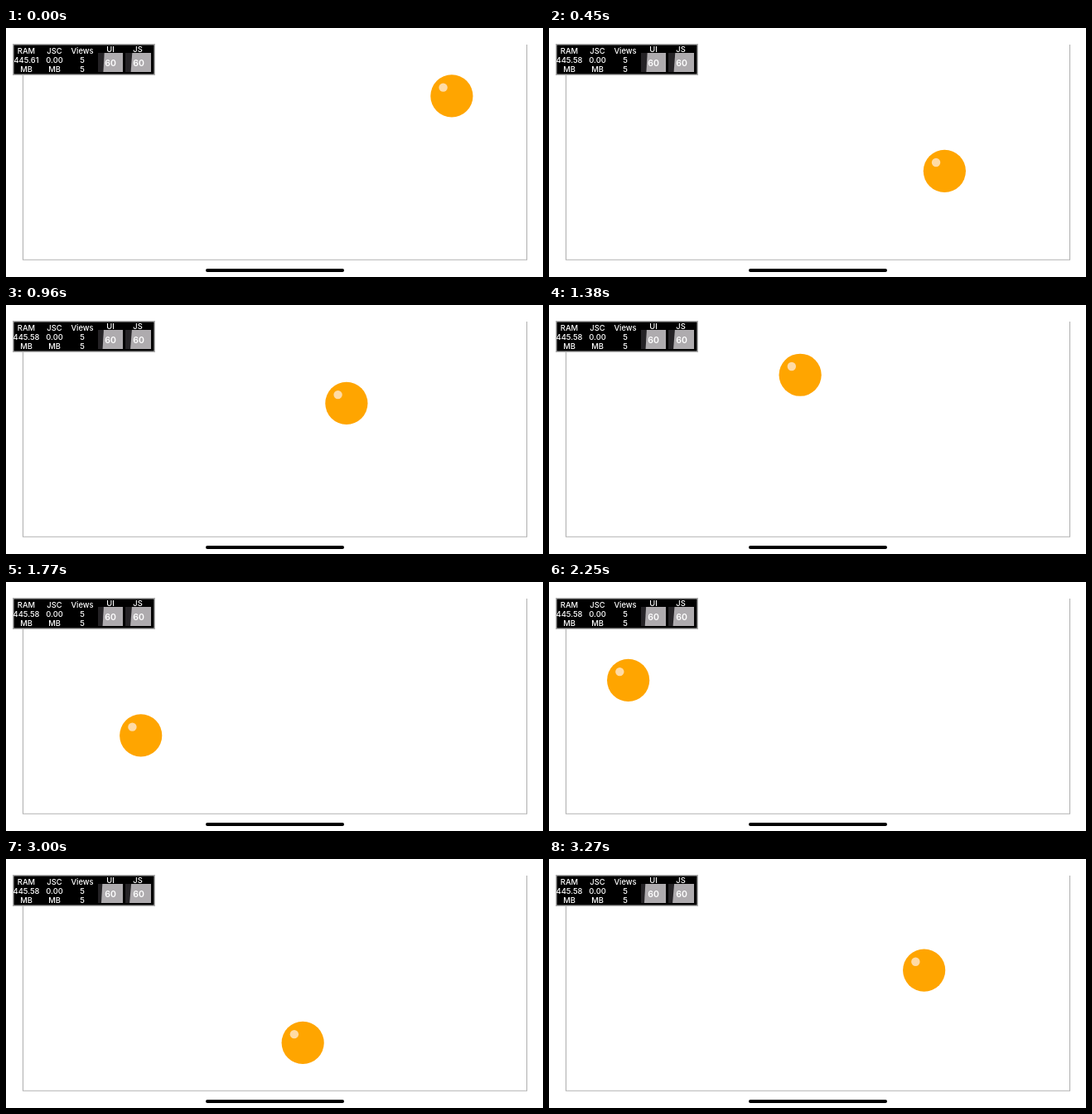
These frames come from a looping animation (648 by 300 pixels, 3.3 s). An HTML page:

```html
<!DOCTYPE html>
<html>
<head>
<meta charset="utf-8">
<style>
html, body { margin: 0; width: 100%; height: 100%; overflow: hidden; background: #fff; }
svg { display: block; width: 648px; height: 300px; }
text { font: 500 9.4px Inter, Roboto, sans-serif; fill: #fff; text-anchor: middle; }
.fps { font-size: 10.5px; font-weight: 600; }
</style>
</head>
<body>
<svg viewBox="0 0 648 300">
  <path d="M20.5 20V279.3H628.5V20" fill="none" stroke="#b2b2b2" stroke-width="1.1"/>
  <rect x="241" y="290" width="167" height="4" rx="2"/>
  <g id="ball">
    <circle r="25.6" fill="#ffa500"/>
    <circle cx="-10.3" cy="-10.3" r="5.2" fill="#ffdba6"/>
  </g>
  <rect x="8.75" y="19.75" width="170.5" height="36.5" stroke="#b3b3b3" stroke-width="1.5"/>
  <path d="M111 30h10v23h-10zM144 30h10v23h-10z" fill="#252326"/>
  <path id="ui" fill="#aeabae"/>
  <path id="js" fill="#aeabae"/>
  <text x="24.5" y="31.3">RAM</text>
  <text x="24.5" y="42.3" id="ram"></text>
  <text x="24.5" y="53.3">MB</text>
  <text x="58.5" y="31.3">JSC</text>
  <text x="58.5" y="42.3">0.00</text>
  <text x="58.5" y="53.3">MB</text>
  <text x="92" y="31.3">Views</text>
  <text x="92" y="42.3">5</text>
  <text x="92" y="53.3">5</text>
  <text x="126" y="28.6">UI</text>
  <text x="159" y="28.6">JS</text>
  <text x="126" y="45.7" class="fps">60</text>
  <text x="160" y="45.7" class="fps">60</text>
</svg>
<script>
const LOOP = 3300, G = 0.00111;
const $ = id => document.getElementById(id);

// start time, x, y, vx, vy, gravity
const legs = [
  [0, 538, 82, -0.1345, -0.05, G],
  [603, 456.9, 253.5, -0.1286, -0.576, G],     // floor
  [990, 407.1, 113.7, -0.019, 0.03, 0],        // caught
  [1098, 405, 116.9, -0.36, -0.2724, G],       // thrown
  [1897, 117.4, 253.5, -0.36, -0.578, G],      // floor
  [2102, 43.5, 158.3, 0.35, -0.3504, G],       // left wall
  [2938, 336.1, 253.5, 0.35, -0.5435, G]       // floor
];

function ballAt(t) {
  const [start, x, y, vx, vy, g] = legs.findLast(leg => leg[0] <= t);
  const d = t - start;
  return [x + vx * d, y + vy * d + g * d * d / 2];
}

const graph = (top, bottom, right) => `M${top} 30H${right}V53H${bottom}Z`;

function draw(now) {
  const t = now % LOOP;
  $("ball").setAttribute("transform", `translate(${ballAt(t)})`);
  $("ram").textContent = t < 270 ? "445.61" : "445.58";
  const shift = [750, 1900, 2400].filter(s => t >= s).length;
  $("ui").setAttribute("d", graph(118.7 - shift * 0.8, 117.4 - shift * 0.8, 141));
  $("js").setAttribute("d", graph(152.3 - shift * 0.4, 150.6 - shift * 0.5, 175));
}

const begin = performance.now();
function tick() {
  draw(performance.now() - begin);
  requestAnimationFrame(tick);
}
tick();
</script>
</body>
</html>
```
